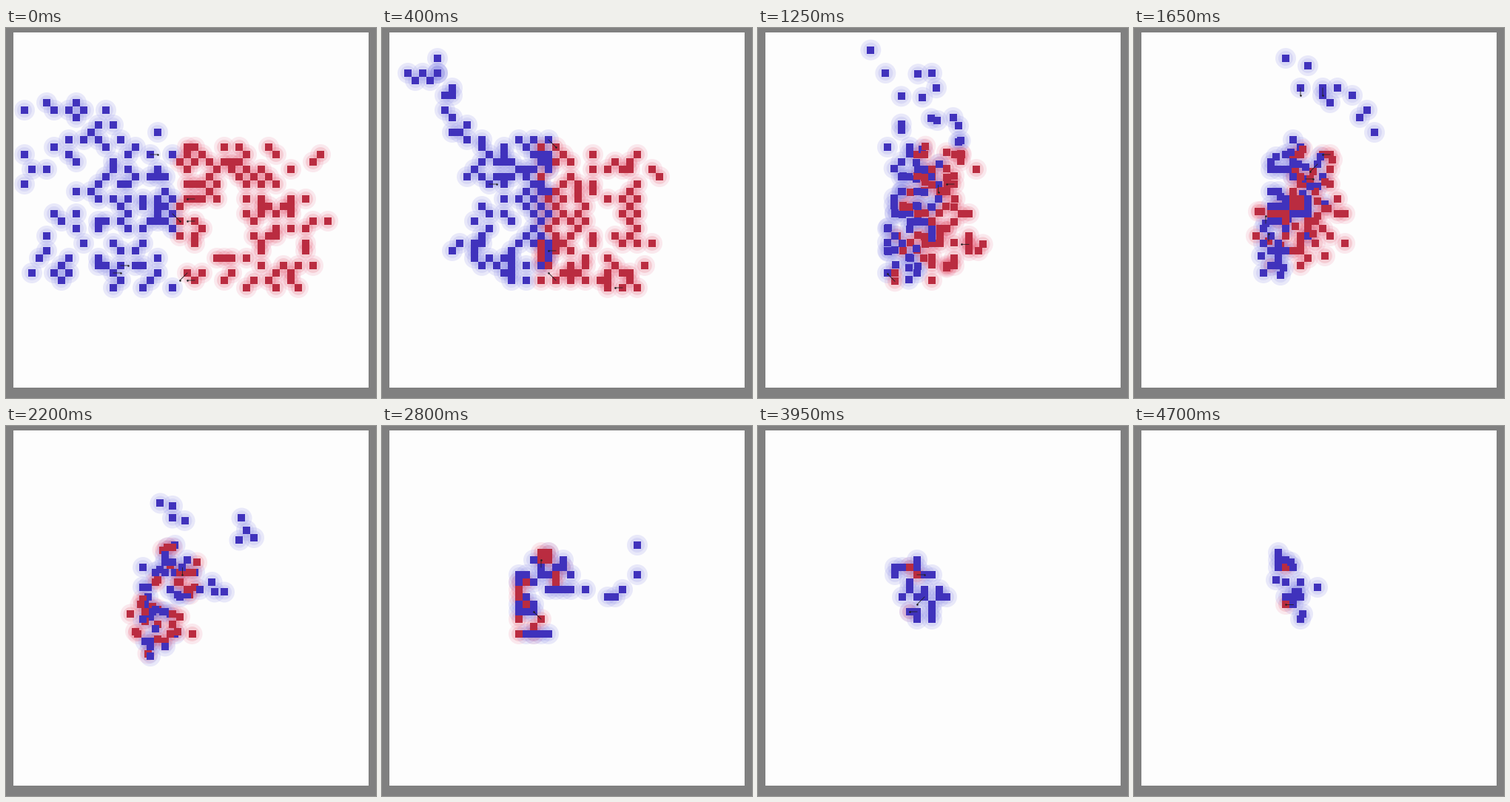
Recreate the animation shown at these times as a matplotlib script. Size 500 px wide and 500 px high, loop 4.75 s.

```python
import numpy as np
import matplotlib.pyplot as plt
from matplotlib.animation import FuncAnimation
from matplotlib.patches import Rectangle
from matplotlib.path import Path

SIZE, DPI, FRAMES, STEP = 500, 100, 95, 50
CELL = 10
KEYS = [0, 8, 18, 33, 56, 79, 94]
CENTRE = np.array([225, 240])
rng = np.random.default_rng(7)

GREY, PAPER, INK = "#808080", "#fdfdfd", "#202020"
BLUE, RED = 0, 1
# per side: body, outer halo, inner halo
BODY = np.array([(64, 50, 188, 255), (186, 44, 64, 255)]) / 255
OUTER = np.array([(170, 170, 240, 62), (240, 150, 175, 50)]) / 255
INNER = np.array([(110, 110, 220, 32), (225, 70, 90, 42)]) / 255


def snap(p):
    return np.round((p - (5, 1)) / CELL) * CELL + (5, 1)


def sweep(a, b, c, n, scatter):
    """A loose string of flankers along the curve a-c that b pulls on."""
    a, b, c = np.array([a, b, c], float)
    t = np.linspace(0, 1, n)[:, None]
    curve = (1 - t) ** 2 * a + 2 * t * (1 - t) * b + t ** 2 * c
    return snap(curve + rng.normal(0, scatter, (n, 2)))


def crowd(total, outline, front=225, spread=300, even=1.0, jitter=0.0,
          flank=None):
    """Fill an outline at random, thicker near the front line.

    even is the weight of the second colour of the chequerboard.
    """
    gx, gy = np.meshgrid(np.arange(15, 490, CELL), np.arange(11, 486, CELL))
    cells = np.column_stack([gx.ravel(), gy.ravel()])
    cells = cells[Path(outline).contains_points(cells)]
    parity = (cells - (15, 11)).sum(axis=1) // CELL % 2
    weight = np.exp(-abs(cells[:, 0] - front) / spread)
    weight *= np.where(parity == 1, 1, even)
    flankers = np.empty((0, 2)) if flank is None else sweep(*flank)
    n = min(total - len(flankers), len(cells))
    picked = rng.choice(len(cells), n, replace=False, p=weight / weight.sum())
    mass = cells[picked].astype(float)
    loose = rng.random(n) < jitter
    mass[loose] += rng.choice([-3, 3], (loose.sum(), 2))
    return np.vstack([flankers, mass])


HOOK = [(182, 195), (215, 165), (262, 190), (258, 222), (212, 226),
        (230, 290), (180, 285)]

blue_poses = [
    crowd(98, [(18, 100), (155, 100), (180, 150), (215, 132), (240, 195),
               (225, 358), (18, 340)], even=0.2),
    crowd(98, [(110, 180), (200, 133), (228, 150), (228, 338), (150, 346),
               (80, 290)], 220, 70, even=0.2,
          flank=[(60, 55), (90, 80), (130, 160), 19, 13]),
    crowd(84, [(160, 165), (240, 135), (240, 338), (165, 346), (140, 285),
               (170, 220)], 225, 45, even=0.2, jitter=0.2,
          flank=[(125, 20), (150, 170), (238, 70), 13, 9]),
    crowd(66, [(215, 146), (265, 155), (258, 240), (240, 290), (215, 335),
               (162, 335), (185, 180)], 200, 28, jitter=0.25,
          flank=[(221, 55), (270, 75), (330, 130), 11, 13]),
    crowd(35, HOOK, flank=[(345, 171), (325, 250), (275, 222), 6, 7]),
    crowd(23, [(178, 190), (228, 174), (262, 222), (238, 268), (205, 266),
               (180, 226)], 215, 30),
    crowd(18, [(180, 190), (200, 158), (240, 208), (262, 226), (222, 268),
               (200, 235)], 215, 30, jitter=0.3),
]

red_poses = [
    crowd(92, [(220, 155), (265, 150), (450, 165), (450, 200), (405, 230),
               (440, 245), (440, 330), (405, 358), (240, 346)], even=0.12),
    crowd(92, [(210, 155), (350, 170), (400, 215), (360, 250), (400, 335),
               (340, 356), (208, 346)], 230, 90, even=0.06),
    crowd(86, [(205, 156), (290, 160), (345, 178), (300, 230), (320, 300),
               (285, 346), (180, 352), (210, 330)], 235, 50, even=0.15,
          jitter=0.2),
    crowd(60, [(210, 150), (288, 175), (288, 300), (225, 325), (165, 325),
               (150, 245), (205, 240)], 225, 40, jitter=0.25),
    crowd(17, HOOK),
    crowd(3, [(198, 186), (230, 186), (212, 256), (198, 256)]),
    crowd(2, [(198, 186), (212, 186), (212, 246), (198, 246)]),
]


def match(starts, goals):
    """Give each goal, outermost first, the nearest start still free."""
    free = np.ones(len(starts), bool)
    chosen = np.zeros(len(goals), int)
    for g in np.argsort(-np.hypot(*(goals - CENTRE).T)):
        gap = np.hypot(*(starts - goals[g]).T)
        chosen[g] = np.argmin(np.where(free, gap, np.inf))
        free[chosen[g]] = False
    return chosen, np.flatnonzero(free)


def walk(track, a, b, t0, t1):
    """Move from a to b in short hops between grid cells."""
    hops = max(2, round((t1 - t0) / 3.5))
    share = np.linspace(0, 1, hops + 1)[:, None]
    way = a + (b - a) * share
    way[1:-1] = snap(way[1:-1] + rng.normal(0, 4.5, (hops - 1, 2)))
    t = np.arange(t0, t1 + 1)
    when = t0 + (t1 - t0) * share[:, 0]
    for axis in (0, 1):
        track[t0:t1 + 1, axis] = np.interp(t, when, way[:, axis])


def march(poses):
    """One path per fighter; the fallen leave the field as NaN."""
    tracks = np.full((len(poses[0]), FRAMES, 2), np.nan)
    ids = np.arange(len(poses[0]))
    for k, (t0, t1) in enumerate(zip(KEYS, KEYS[1:])):
        starts, goals = poses[k], poses[k + 1]
        chosen, fallen = match(starts, goals)
        for i, goal in zip(chosen, goals):
            walk(tracks[ids[i]], starts[i], goal, t0, t1)
        for i in fallen:
            near = goals[np.argmin(np.hypot(*(goals - starts[i]).T))]
            walk(tracks[ids[i]], starts[i], near, t0, t1)
            tracks[ids[i], rng.integers(t0 + 1, t1):] = np.nan
        ids = ids[chosen]
    return tracks


sides = [march(blue_poses), march(red_poses)]
tracks = np.concatenate(sides)
team = np.repeat([BLUE, RED], [len(s) for s in sides])
order = rng.permutation(len(team))
tracks, team = tracks[order], team[order]


def find_shots(n, pos, side):
    """Short strokes from a few fighters towards their nearest enemy."""
    shots = []
    local = np.random.default_rng(n)
    for i in np.flatnonzero(local.random(len(pos)) < 0.05):
        foes = pos[side != side[i]]
        d = foes[np.argmin(np.hypot(*(foes - pos[i]).T))] - pos[i]
        gap = np.hypot(*d)
        if 5 < gap < 120:
            shots.append((pos[i], pos[i] + CELL * np.round(d / gap)))
    return shots


fig = plt.figure(figsize=(SIZE / DPI, SIZE / DPI), dpi=DPI, facecolor=GREY)
ax = fig.add_axes([0, 0, 1, 1])
ax.set(xlim=(0, SIZE), ylim=(SIZE, 0))
ax.axis("off")
ax.add_patch(Rectangle((10, 6), 480, 480, fc=PAPER, ec="none", zorder=0))


def layer(marker, px, z):
    size = (px * 72 / DPI) ** 2
    return ax.scatter([], [], s=size, marker=marker, linewidths=0, zorder=z)


layers = [(layer("o", 28, 1), OUTER), (layer("o", 20, 2), INNER),
          (layer("s", 10, 3), BODY)]
strokes, = ax.plot([], [], color=INK, lw=0.6, zorder=4)
tips, = ax.plot([], [], ls="", marker="o", ms=1.8, mew=0, color=INK, zorder=4)


def draw(n):
    alive = ~np.isnan(tracks[:, n, 0])
    pos, side = tracks[alive, n], team[alive]
    for dots, colours in layers:
        dots.set_offsets(pos)
        dots.set_facecolors(colours[side])
    shots = find_shots(n, pos, side)
    gap = (np.nan, np.nan)
    line = np.array([p for a, b in shots for p in (a, b, gap)]).reshape(-1, 2)
    ends = np.array([b for _, b in shots]).reshape(-1, 2)
    strokes.set_data(line[:, 0], line[:, 1])
    tips.set_data(ends[:, 0], ends[:, 1])
    return [dots for dots, _ in layers] + [strokes, tips]


anim = FuncAnimation(fig, draw, frames=FRAMES, interval=STEP, repeat=True)
plt.show()
```
